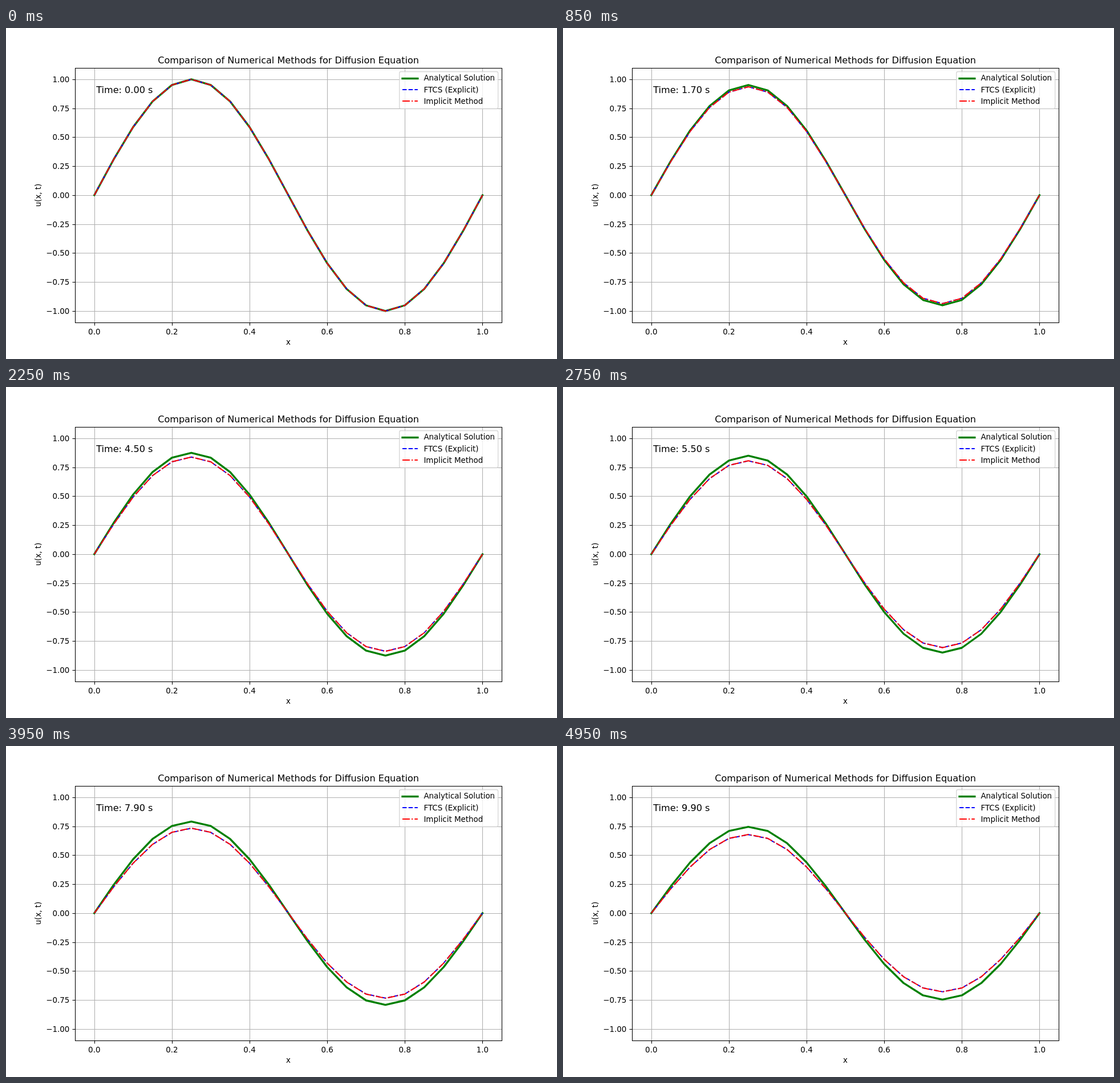
Animation of 966x580 px, one loop 5000 ms. Source, as an HTML page with a canvas:

```html
<!DOCTYPE html>
<html lang="en">
<head>
<meta charset="utf-8">
<title>Diffusion equation</title>
<style>
  html, body { margin: 0; height: 100%; overflow: hidden; background: #fff; }
  canvas { display: block; }
</style>
</head>
<body>
<canvas id="stage" width="966" height="580"></canvas>
<script>
const ctx = document.getElementById('stage').getContext('2d');
const PT = 0.966 * 100 / 72;            // pixels per point
const EM = 10 * PT;
const box = { left: 120.75, right: 869.4, top: 69.6, bottom: 516.2 };
const toX = x => 154.78 + 680.59 * x;
const toY = y => 292.95 - 203 * y;
const snap = v => Math.floor(v + 0.5) + 0.5;

// Decay per second of the exact mode, and decay per step of the grid mode
const EXACT_RATE = 0.00075 * 4 * Math.PI ** 2;
const STEP = 0.1;
const GRID_LOSS = 0.001 * STEP * 1600 * Math.sin(Math.PI / 20) ** 2;

const unit = 1.5 * PT;
const series = [
  { label: 'Analytical Solution', color: '#008000', width: 2.5 * PT, dash: [],
    keyY: 88.5, textY: 92, amplitude: n => Math.exp(-EXACT_RATE * n * STEP) },
  { label: 'FTCS (Explicit)', color: '#0000ff', width: unit, dash: [3.7, 1.6],
    keyY: 108, textY: 113, amplitude: n => (1 - GRID_LOSS) ** n },
  { label: 'Implicit Method', color: '#ff0000', width: unit, dash: [6.4, 1.6, 1, 1.6],
    keyY: 128, textY: 133, amplitude: n => (1 + GRID_LOSS) ** -n }
];

function text(str, x, y, align = 'left', points = 10) {
  ctx.font = `${points * PT}px "DejaVu Sans", sans-serif`;
  ctx.textAlign = align;
  ctx.fillStyle = '#000';
  ctx.fillText(str, x, y);
}

function polyline(points, color, width, dash = [], cap = 'butt') {
  ctx.strokeStyle = color;
  ctx.lineWidth = width;
  ctx.lineCap = cap;
  ctx.lineJoin = 'round';
  ctx.setLineDash(dash);
  ctx.beginPath();
  points.forEach(([x, y]) => ctx.lineTo(x, y));
  ctx.stroke();
  ctx.setLineDash([]);
}

function drawSeries(s, points) {
  const cap = s.dash.length ? 'butt' : 'square';
  polyline(points, s.color, s.width, s.dash.map(d => d * unit), cap);
}

function drawAxes() {
  const [l, r, t, b] = [box.left, box.right, box.top, box.bottom].map(snap);
  const thin = 0.8 * PT;
  for (let i = 0; i <= 5; i++) {
    const x = toX(i / 5);
    polyline([[snap(x), t], [snap(x), b]], '#b0b0b0', thin);
    polyline([[snap(x), b], [snap(x), b + 5]], '#000', thin);
    text((i / 5).toFixed(1), x, 537, 'center');
  }
  for (let i = -4; i <= 4; i++) {
    const y = snap(toY(i / 4));
    polyline([[l, y], [r, y]], '#b0b0b0', thin);
    polyline([[l - 5, y], [l, y]], '#000', thin);
    text((i / 4).toFixed(2).replace('-', '\u2212'), 111.3, y + 4.5, 'right');
  }
  const middle = (box.left + box.right) / 2;
  text('Comparison of Numerical Methods for Diffusion Equation', middle, 62, 'center', 12);
  text('x', middle, 555, 'center');
  ctx.save();
  ctx.translate(61, 293);
  ctx.rotate(-Math.PI / 2);
  text('u(x, t)', 0, 0, 'center');
  ctx.restore();
}

function drawFrame() {
  const [l, r, t, b] = [box.left, box.right, box.top, box.bottom].map(snap);
  ctx.strokeStyle = '#000';
  ctx.lineWidth = 0.8 * PT;
  ctx.lineJoin = 'miter';
  ctx.strokeRect(l, t, r - l, b - t);
}

function drawLegend() {
  ctx.beginPath();
  ctx.roundRect(689.7, 76.5, 173, 65, 0.2 * EM);
  ctx.fillStyle = 'rgba(255, 255, 255, 0.8)';
  ctx.fill();
  ctx.strokeStyle = 'rgba(204, 204, 204, 0.8)';
  ctx.lineWidth = PT;
  ctx.stroke();
  for (const s of series) {
    drawSeries(s, [[695, s.keyY], [695 + 2 * EM, s.keyY]]);
    text(s.label, 732.4, s.textY);
  }
}

function draw() {
  const n = Math.floor(performance.now() / 50) % 100;
  ctx.fillStyle = '#fff';
  ctx.fillRect(0, 0, 966, 580);
  drawAxes();
  for (const s of series) {
    const a = s.amplitude(n);
    drawSeries(s, Array.from({ length: 21 }, (_, i) =>
      [toX(i / 20), toY(a * Math.sin(Math.PI * i / 10))]));
  }
  drawFrame();
  text(`Time: ${(n * STEP).toFixed(2)} s`, 158.2, 114, 'left', 12);
  drawLegend();
  requestAnimationFrame(draw);
}
draw();
</script>
</body>
</html>
```
